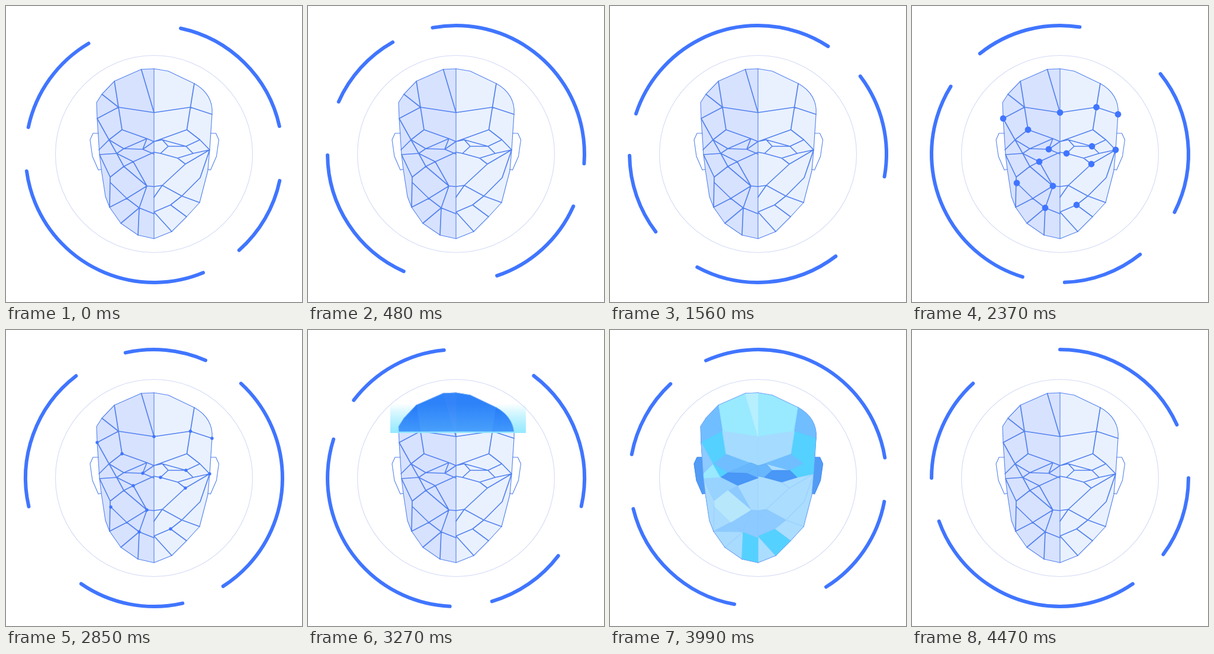
These frames come from a looping animation (500 px wide and 500 px high, 4500 ms). An HTML page with a canvas:

```html
<!DOCTYPE html>
<html lang="en">
<head>
<meta charset="utf-8">
<title>Face scan</title>
<style>
  html, body { margin: 0; width: 100%; height: 100%; overflow: hidden; background: #fff; }
  canvas { display: block; width: 500px; height: 500px; }
</style>
</head>
<body>
<canvas id="stage" width="500" height="500"></canvas>
<script>
const ctx = document.getElementById('stage').getContext('2d');
const LOOP = 4500, STEP = 30, CENTER = 250;
const BLUE = '#4075ff', LINE = '#5482ee', EAR = '#4193f5';

const mirror = ([x, y]) => [501.5 - x, y];
const progress = (t, from, to) => Math.min(1, Math.max(0, (t - from) / (to - from)));
const smooth = k => k * k * (3 - 2 * k);
const radians = degrees => degrees * Math.PI / 180;

// Mesh vertices, one letter each; every shape below is a word of these letters.
const points = {
  b: [228.5, 107], c: [183, 127], d: [162, 149], e: [153, 163], f: [154, 190], 5: [157, 243],
  g: [158, 251], h: [161, 276], 7: [168, 322], i: [175, 340], j: [194, 367], k: [223, 387],
  m: [280, 381], n: [305, 356], o: [327, 332], p: [341, 278], q: [344, 243], r: [348, 183],
  s: [318, 131], t: [274, 110], 6: [350, 131],
  A: [190, 171], C: [196, 209], D: [174, 226], 2: [238, 224], F: [199, 241], G: [231, 242],
  I: [187, 249], J: [215, 263], K: [199, 271], L: [176, 289], 3: [177, 299],
  M: [238, 304], O: [204, 325], P: [225, 341],
  V: [264, 226], W: [274, 237], X: [304, 237], Y: [316, 249], Z: [261, 249], u: [290, 257],
  v: [303, 267], w: [328, 290], x: [264, 303], y: [297, 321], z: [278, 336]
};
const midline = { a: 106, B: 180, E: 229, R: 247, H: 250, N: 305, 1: 323, Q: 348, 4: 351, l: 393 };
for (const key in midline) points[key] = [CENTER, midline[key]];
[...'ACD'].forEach((key, i) => points['STU'[i]] = mirror(points[key]));

const leftEar = [[156, 215], [147, 215], [142, 226], [146, 254], [156, 277], [161, 276]];
const ears = [leftEar, leftEar.map(mirror)];

const edges = ('al bB cA dA fABSr AC2E CDFGH fD5 DIF G2F gEx GE gIJR IKL JK KM JM gL Li 3OM iOPM ' +
  'jPk P4 MNx Ss STE TUq EVXU VWX XY WZR qYuZ qvu qwy vx x1 xyo yzn zQm')
  .replace('gEx ', '').split(' ');

const facets = {
  '#98ebff': 'cbBA atsSB D5gI',
  '#b9f1ff': 'baB',
  '#6bbbff': 'dcA edAf C2FD TEVXU s6rS',
  '#4dd0ff': 'fACD SrqUT qYXU P4lk Qznm DFI',
  '#8ac8ff': 'fD5 KJM OMP iOP MN4P NxyzQ',
  '#a5dbff': 'ABEC BSTE',
  '#62b2fb': 'F2EG GERH EVWZR',
  '#4090f6': 'IFGHJ WXYuZ',
  '#97d2ff': 'gIKL IJK',
  '#b8e8fb': 'LKMO3'
};

const dotSets = [
  { corners: 'AD2ILOVTUqZuxy', shown: [16, 50] },
  { corners: 'fCBSrGJ3MPXqZvz', shown: [64, 100] }
];

// Arcs as start and length in degrees; turns as ticks taken by each part of a spin.
const arcs = [[-90, 65.5], [0, 36.5], [55.5, 104.8], [180, 47.4]];
const spinTicks = [30, 29, 17, 28, 29, 17];
const spinAngles = [360, 180, 180];

function rotation(tick) {
  let angle = 0, start = 0;
  spinTicks.forEach((ticks, i) => {
    angle += spinAngles[i % 3] * progress(tick, start, start + ticks);
    start += ticks;
  });
  return angle;
}

const vertices = word => [...word].map(key => points[key]);

function trace(list) {
  list.forEach(([x, y], i) => i ? ctx.lineTo(x, y) : ctx.moveTo(x, y));
}

function stroke(color, width) {
  ctx.strokeStyle = color;
  ctx.lineWidth = width;
  ctx.stroke();
}

function fill(color) {
  ctx.fillStyle = color;
  ctx.fill();
}

function fillPolygon(list, color) {
  ctx.beginPath();
  trace(list);
  ctx.closePath();
  fill(color);
  stroke(color, 0.7);
}

function headPath(leftSide = 'bcdefgh7ijkl') {
  ctx.beginPath();
  trace(vertices('lmnopqr'));
  ctx.bezierCurveTo(350, 162, 340, 143, ...points.s);
  vertices('ta' + leftSide).forEach(p => ctx.lineTo(...p));
  ctx.closePath();
}

function drawRing(tick) {
  ctx.beginPath();
  ctx.arc(CENTER, CENTER, 166.5, 0, Math.PI * 2);
  stroke('#d3daf6', 1.1);
  ctx.lineCap = 'round';
  const turn = rotation(tick);
  for (const [start, length] of arcs) {
    ctx.beginPath();
    ctx.arc(CENTER, CENTER, 217, radians(start + turn), radians(start + turn + length));
    stroke(BLUE, 6);
  }
}

function drawMesh() {
  headPath();
  fill('#d7e2ff');
  headPath('');
  fill('#e9f1ff');
  ctx.lineJoin = 'round';
  ctx.beginPath();
  edges.slice(1).forEach(word => trace(vertices(word)));
  stroke(LINE, 1.7);
  ctx.beginPath();
  trace(vertices(edges[0]));
  ears.forEach(trace);
  stroke(LINE, 1.1);
  headPath();
  stroke(LINE, 1.1);
}

function drawDots(tick) {
  for (const { corners, shown: [from, to] } of dotSets) {
    const size = smooth(progress(tick, from, from + 8) - progress(tick, to - 8, to));
    if (!size) continue;
    for (const [x, y] of vertices(corners)) {
      ctx.beginPath();
      ctx.arc(x, y, 5.4 * size, 0, Math.PI * 2);
      fill(BLUE);
    }
  }
}

function drawColorFace(tick, bottom) {
  ctx.save();
  ctx.globalAlpha = 1 - progress(tick, 133, 144);
  ctx.beginPath();
  ctx.rect(0, 0, 500, bottom);
  ctx.clip();
  ears.forEach(ear => fillPolygon(ear, EAR));

  ctx.save();
  headPath();
  fill('#a5dbff');
  ctx.clip();
  for (const [color, words] of Object.entries(facets)) {
    words.split(' ').forEach(word => fillPolygon(vertices(word), color));
  }
  const tint = 0.78 * (1 - progress(tick, 113, 122));
  if (tint) {
    ctx.globalAlpha = tint;
    headPath();
    fill('#1066f8');
  }
  ctx.restore();

  headPath();
  stroke('#6fa9f8', 0.8);
  ctx.restore();
}

function drawGlow(y, alpha) {
  const glow = ctx.createLinearGradient(0, y - 50, 0, y);
  glow.addColorStop(0, 'rgba(140,232,255,0)');
  glow.addColorStop(1, `rgba(140,232,255,${alpha})`);
  ctx.fillStyle = glow;
  ctx.fillRect(139, y - 50, 229, 50);
}

function drawScan(tick) {
  if (tick < 104 || tick >= 144) return;
  const y = 86.5 + 306 * smooth(progress(tick, 104, 121));
  const scanning = tick < 121;
  if (scanning) drawGlow(y, 0.9);
  drawColorFace(tick, scanning ? y - 2.5 : 500);
  if (scanning) drawGlow(y, 0.3);
}

function draw(time) {
  const tick = Math.floor((time % LOOP) / STEP) + 1;
  ctx.fillStyle = '#fff';
  ctx.fillRect(0, 0, 500, 500);
  drawRing(tick);
  drawMesh();
  drawDots(tick);
  drawScan(tick);
}

let begin;
function loop(now) {
  begin ??= now;
  draw(now - begin);
  requestAnimationFrame(loop);
}
draw(0);
requestAnimationFrame(loop);
</script>
</body>
</html>
```
